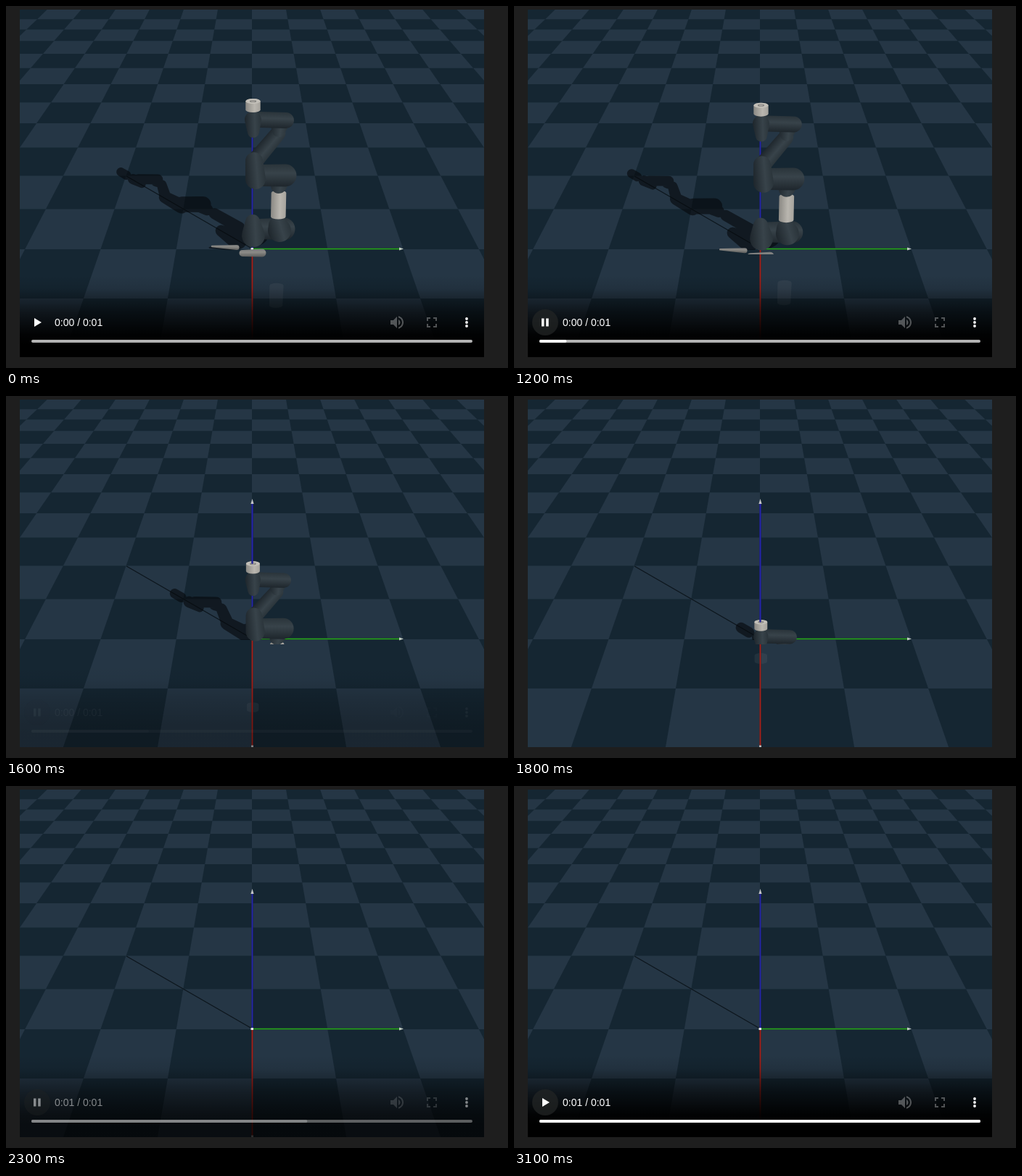
Write an HTML page with a canvas that moves like this. It is 692 px wide and 500 px high and loops after 3.2 s.

```html
<!DOCTYPE html>
<html lang="en">
<head>
<meta charset="utf-8">
<title>Falling arm</title>
<style>
html, body { margin: 0; width: 100%; height: 100%; overflow: hidden; background: #1e1e1e; }
canvas, svg { position: absolute; left: 0; top: 0; display: block; }
text { font: 14px "Liberation Sans", Arial, sans-serif; fill: #fff; }
</style>
</head>
<body>
<canvas id="scene" width="692" height="500"></canvas>
<svg width="692" height="500" viewBox="0 0 692 500">
  <defs>
    <linearGradient id="dim" x1="0" y1="0" x2="0" y2="1">
      <stop offset="0" stop-opacity="0"/>
      <stop offset=".16" stop-opacity=".1"/>
      <stop offset=".45" stop-opacity=".6"/>
      <stop offset=".72" stop-opacity=".94"/>
      <stop offset=".84" stop-opacity="1"/>
    </linearGradient>
  </defs>
  <rect id="shade" x="19" y="372" width="640" height="113" fill="url(#dim)"/>
  <g id="controls" fill="#fff">
    <circle id="hover" cx="43" cy="437" r="18" fill="#222425" fill-opacity=".75"/>
    <path id="play" d="M39 431L49 437L39 443Z"/>
    <path id="pause" d="M38 431.5h3.5v11H38zM44.2 431.5h3.5v11h-3.5z"/>
    <text id="clock" x="67" y="442">0:00 / 0:01</text>
    <g fill-opacity=".3">
      <path transform="translate(527 425)" d="M3 9v6h4l5 5V4L7 9H3zm13.5 3c0-1.77-1.02-3.29-2.5-4.03v8.05c1.48-.73 2.5-2.25 2.5-4.02zM14 3.23v2.06c2.89.86 5 3.54 5 6.71s-2.11 5.85-5 6.71v2.06c4.01-.91 7-4.49 7-8.77s-2.99-7.86-7-8.77z"/>
      <path transform="translate(575 425)" d="M7 14H5v5h5v-2H7v-3zm-2-4h2V7h3V5H5v5zm12 7h-3v2h5v-5h-2v3zM14 5v2h3v3h2V5h-5z"/>
    </g>
    <circle cx="635" cy="432" r="1.9"/>
    <circle cx="635" cy="437" r="1.9"/>
    <circle cx="635" cy="442" r="1.9"/>
    <rect x="35" y="461" width="608" height="4" rx="2" fill="#b3b3b3"/>
    <rect id="bar" x="35" y="461" width="0" height="4" rx="2"/>
  </g>
</svg>
<script>
const LOOP = 3200, STEP = 100, START = 1080, END = 2850;
const CX = 339, FLOOR = 335, HORIZON = -267, DEPTH = 603, ZOOM = 0.00078;
const ctx = document.getElementById('scene').getContext('2d');
const el = id => document.getElementById(id);
const clamp = v => Math.min(1, Math.max(0, v));

// The arm at rest, back to front: round limbs from (x1, y1, r1) to (x2, y2, r2)
const limb = (x1, y1, r1, x2, y2, r2, ink = 'dark') => ({ x1, y1, r1, x2, y2, r2, ink });
const ARM = [
  limb(284, 332, 1.2, 318, 333.5, 3.5, 'metal'),
  limb(326, 341.5, 4.5, 353, 341, 5.5, 'metal'),
  limb(350, 308, 14, 383, 308, 15.5),
  limb(375, 303, 13, 377, 310, 16),
  limb(340, 298, 10, 341, 317, 16),
  limb(376, 258, 10.3, 375.3, 291, 10.3, 'white'),
  limb(375, 176, 10.5, 343, 214, 11.5),
  limb(376, 248, 11, 378, 238, 14),
  limb(350, 234, 15, 385, 234, 15.5),
  limb(342, 214, 12, 344, 239, 14),
  limb(376, 172, 9, 377, 164, 12),
  limb(350, 157, 11, 386, 158, 11),
  limb(340.5, 157, 11.5, 341, 174, 8),
  limb(340.5, 131.5, 10.2, 340.5, 143.5, 10.2, 'white')
];
const INK = {
  metal: ['#77797a', '#8c8b87', '#5b5c5b'],
  dark: ['#2a343a', '#38434a', '#1e262c'],
  white: ['#a6a39d', '#b9b6af', '#8b8984']
};

// Screen point to side offset and height, and three ways back
function lift(x, y) {
  const s = 1 + ZOOM * (FLOOR - y);
  return [(x - CX) / s, (FLOOR - y) / s, s];
}
function direct(x, z) {
  const k = 1 / (1 - ZOOM * z);
  return [CX + x * k, FLOOR - z * k, k];
}
function shadow(x, z) {
  const k = 1 / (1 + 0.2027 * z / 165.5);
  return [CX + (x - 1.257 * z) * k, HORIZON + DEPTH * k, k * 0.85];
}
function mirror(x, z) {
  const k = 1 / (1 + ZOOM * z);
  return [CX + x * k, 345 + z * k, k];
}

function place(part, view, drop) {
  const end = (x0, y0, r0) => {
    const [side, z, s] = lift(x0, y0);
    const [x, y, k] = view(side, z - drop);
    return { x, y, r: r0 * k / s };
  };
  return [end(part.x1, part.y1, part.r1), end(part.x2, part.y2, part.r2)];
}

function capsule(a, b) {
  const dx = b.x - a.x, dy = b.y - a.y;
  const dir = Math.atan2(dy, dx);
  const turn = Math.acos(Math.max(-1, Math.min(1, (a.r - b.r) / Math.hypot(dx, dy))));
  ctx.moveTo(a.x + a.r * Math.cos(dir + turn), a.y + a.r * Math.sin(dir + turn));
  ctx.arc(a.x, a.y, a.r, dir + turn, dir - turn + 2 * Math.PI);
  ctx.arc(b.x, b.y, b.r, dir - turn, dir + turn);
  ctx.closePath();
}

function cylinder(a, b) {
  const [top, low] = a.y < b.y ? [a, b] : [b, a];
  ctx.ellipse(top.x, top.y, top.r, top.r * 0.35, 0, Math.PI, 2 * Math.PI);
  ctx.ellipse(low.x, low.y, low.r, low.r * 0.35, 0, 0, Math.PI);
  ctx.closePath();
}

function clipped(y, h, draw) {
  ctx.save();
  ctx.beginPath();
  ctx.rect(19, y, 640, h);
  ctx.clip();
  draw();
  ctx.restore();
}

function line(x1, y1, x2, y2, color, width) {
  ctx.strokeStyle = color;
  ctx.lineWidth = width;
  ctx.beginPath();
  ctx.moveTo(x1, y1);
  ctx.lineTo(x2, y2);
  ctx.stroke();
}

function rod(x1, y1, x2, y2, edge, core) {
  line(x1, y1, x2, y2, edge, 2.4);
  line(x1, y1, x2, y2, core, 1.2);
}
const mast = (top, low) => rod(339.5, top, 339.5, low, '#1e2370', '#2626ac');

function poly(color, ...xy) {
  ctx.fillStyle = color;
  ctx.beginPath();
  for (let i = 0; i < xy.length; i += 2) ctx.lineTo(xy[i], xy[i + 1]);
  ctx.fill();
}

function floor() {
  ctx.fillStyle = '#152632';
  ctx.fillRect(19, 5, 640, 480);
  const rowY = n => HORIZON + 1 / (1 / DEPTH + n * 1.6806e-4);
  const colX = (c, y) => CX + c * 104.3 * (y - HORIZON) / DEPTH;
  for (let n = -2; n < 12; n++) {
    const a = rowY(n), b = rowY(n + 1);
    for (let c = -8; c < 8; c++) {
      if ((n + c) % 2 === 0) continue;
      poly('#253645', colX(c, a), a, colX(c + 1, a), a, colX(c + 1, b), b, colX(c, b), b);
    }
  }
}

function axes() {
  rod(339.5, 336, 339.5, 485, '#5e2222', '#a8201a');
  mast(147, 335);
  rod(339, 335.5, 544, 335.5, '#1f5a28', '#26a81a');
  poly('#c4c6c8', 339.5, 142, 341.6, 149, 337.4, 149);
  poly('#c4d0c4', 548, 335.5, 542, 337.5, 542, 333.5);
  poly('#b4b4b4', 338, 482.5, 341, 482.5, 341, 485, 338, 485);
  poly('#e8e8e8', 337.5, 334, 341, 334, 341, 337, 337.5, 337);
}

function castShadow(drop) {
  ctx.beginPath();
  for (const part of ARM) capsule(...place(part, shadow, drop));
  ctx.fillStyle = 'rgba(6,9,12,.62)';
  ctx.fill();
}

function reflection(drop) {
  ctx.fillStyle = 'rgba(190,190,185,.08)';
  for (const part of ARM.filter(p => p.ink === 'white')) {
    ctx.beginPath();
    cylinder(...place(part, mirror, drop));
    ctx.fill();
  }
}

// Shades run across each limb, from its upper right to its lower left
function across(a, b, inks) {
  const d = Math.hypot(b.x - a.x, b.y - a.y), r = Math.max(a.r, b.r);
  let nx = (b.y - a.y) / d * r, ny = (a.x - b.x) / d * r;
  if (nx - ny < 0) [nx, ny] = [-nx, -ny];
  const x = (a.x + b.x) / 2, y = (a.y + b.y) / 2;
  const g = ctx.createLinearGradient(x + nx, y + ny, x - nx, y - ny);
  inks.forEach((c, i) => g.addColorStop(i === 1 ? 0.4 : i / 2, c));
  return g;
}

function arm(drop) {
  let head;
  for (const part of ARM) {
    const [a, b] = place(part, direct, drop);
    ctx.fillStyle = across(a, b, INK[part.ink]);
    ctx.beginPath();
    (part.ink === 'white' ? cylinder : capsule)(a, b);
    ctx.fill();
    head = a;
  }
  const disc = (scale, color) => {
    ctx.fillStyle = color;
    ctx.beginPath();
    ctx.ellipse(head.x, head.y, head.r * scale, head.r * scale * 0.35, 0, 0, 7);
    ctx.fill();
  };
  disc(1, '#c2bfb8');
  disc(0.45, '#7d7c79');
  disc(0.3, '#aaa7a2');
  if (head.y > 149) mast(149, head.y);
}

function scene(t) {
  const fall = Math.max(0, t - START);
  const drop = 2.958e-4 * fall * fall;
  const visible = drop < 180;
  clipped(5, 480, () => {
    floor();
    line(166, 235, 339, 335, '#0c151c', 1.2);
  });
  if (visible) {
    clipped(5, 332, () => castShadow(drop));
    clipped(344, 141, () => reflection(drop));
  }
  clipped(5, 480, axes);
  if (visible) clipped(5, 342 - Math.min(drop, 4), () => arm(drop));
}

function player(t) {
  const show = (from, span) => clamp((t - from) / span);
  const hide = (from, span) => (1 - show(from, span)) ** 1.4;
  const alpha = Math.max(hide(1200, 450), Math.min(show(2200, 200), hide(2500, 300)), show(2800, 300));
  const played = clamp((t - START) / 1950 + Math.max(0, t - 2300) / 3700);
  const playing = t > START && t < END;
  const toggle = (id, on) => el(id).setAttribute('visibility', on ? 'visible' : 'hidden');
  el('controls').setAttribute('opacity', alpha);
  el('shade').setAttribute('opacity', alpha ** 0.4);
  toggle('play', !playing);
  toggle('pause', playing);
  toggle('hover', t > START);
  el('bar').setAttribute('width', 608 * played);
  el('clock').textContent = (played > 0.6 ? '0:01' : '0:00') + ' / 0:01';
}

let shown = -1;
const start = performance.now();
function frame() {
  const t = Math.floor((performance.now() - start) % LOOP / STEP) * STEP;
  if (t !== shown) {
    scene(t);
    player(t);
    shown = t;
  }
  requestAnimationFrame(frame);
}
frame();
</script>
</body>
</html>
```
